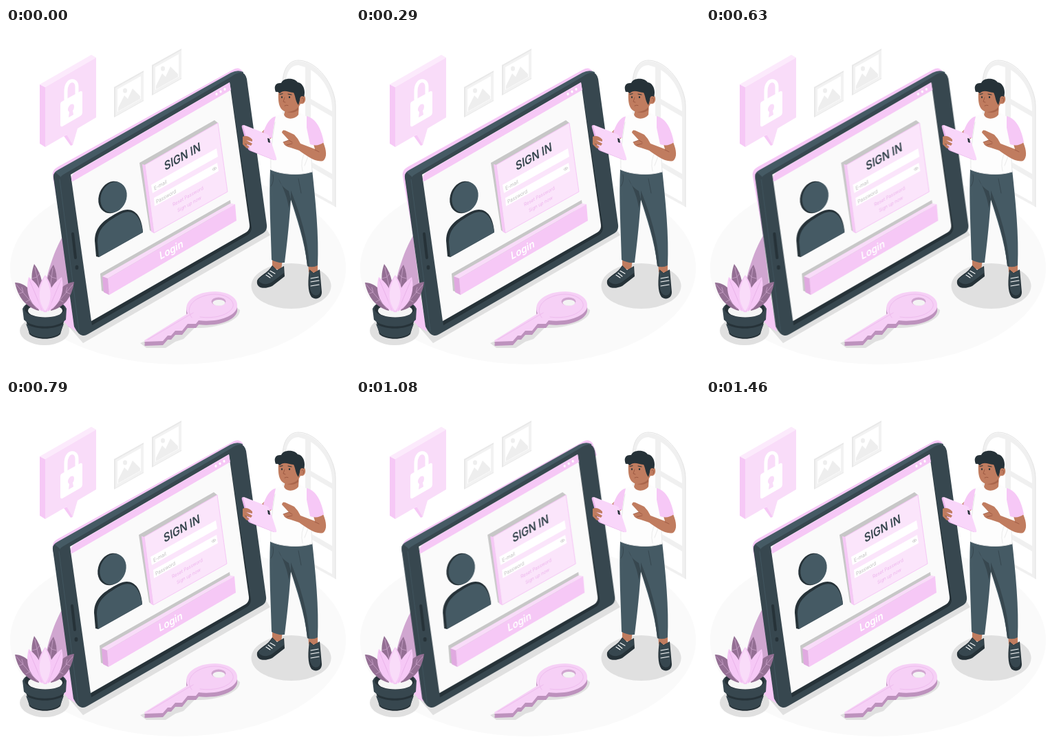
An HTML page for the animation above (1.5 s loop, 500 px wide and 500 px high).

```html
<!DOCTYPE html>
<html lang="en">
<head>
<meta charset="utf-8">
<title>Sign in</title>
<style>
  html, body { margin: 0; width: 100%; height: 100%; overflow: hidden; background: #fff; }
  svg { display: block; width: 100vw; height: 100vh; }
  text { font-family: Inter, Roboto, sans-serif; }
  .pale { fill: #f9dcf9; }
  .pink { fill: #f6c8f6; }
  .mauve { fill: #d0a6d0; }
  .dark { fill: #37474f; }
  .slate { fill: #455a64; }
  .ink { fill: #263238; }
  .floor { fill: #e0e0e0; }
  .skin { fill: #c07c5f; }
  .line { fill: none; stroke-linecap: round; stroke-linejoin: round; }
</style>
</head>
<body>
<svg viewBox="0 0 500 500">
  <defs>
    <g id="picture">
      <path d="M0 24L43 0V44L0 68Z" fill="#e8e8e8"/>
      <path d="M2 25L43 2V43L2 66Z" fill="#f2f2f2"/>
      <path d="M5 27L39 8V41L5 60Z" fill="#fff"/>
      <path d="M6 54L15 36L20 41L27 26L38 37V41L6 59Z" fill="#eee"/>
      <ellipse cx="16" cy="29" rx="3" ry="3.6" fill="#eee"/>
    </g>
    <path id="key" d="M201 454L264 415C256 398 276 383 304 383C327 384 338 394 336 406C332 421 304 428 280 425L276 430L264 430L256 440L246 440L240 447H235L228 455L202 456Z"/>
  </defs>

  <ellipse cx="250" cy="349" rx="244" ry="140" fill="#fafafa"/>

  <!-- arched window -->
  <path d="M402 218V82C402 60 411 48 425 48C452 48 479 84 479 114V260Z" fill="#f0f0f0"/>
  <path d="M402 82C402 58 412 47 425 47C453 47 479 84 479 114V260" class="line" stroke="#e3e3e3"/>
  <path d="M407 78C408 62 415 54 425 54L435 57V98L407 83ZM443 61C462 72 474 96 474 117V121L443 103ZM443 111L474 129V212L443 194ZM443 202L474 220V253L443 236ZM407 91L435 107V190L407 174Z" fill="#fff"/>

  <!-- speech bubble -->
  <path class="pink" d="M49 82L57 86V173L49 168ZM84 157L92 154L97 170L94 171Z"/>
  <path fill="#fceafc" d="M49 82L124 39L131 43L57 86Z"/>
  <path class="pale" d="M57 86L131 43V130L104 146L97 170L88 155L57 173Z"/>
  <path class="line" d="M87 104V92C87 73 103 73 103 85V95" stroke="#fff" stroke-width="5"/>
  <path fill="#fff" d="M81 107L108 92Q111 91 111 94V123Q111 126 108 128L82 143Q79 144 79 141V111Q79 108 81 107Z"/>
  <path class="pale" d="M90 119C90 111 99 107 99 114Q99 118 97 120L98 126L91 130L92 122Q90 121 90 119Z"/>

  <!-- wall pictures -->
  <use href="#picture" x="157" y="62"/>
  <use href="#picture" x="212" y="30"/>

  <!-- tablet shadow, stand and back -->
  <path class="floor" d="M88 430L112 458L384 301L374 285L110 435Z"/>
  <path class="mauve" d="M83 302C73 318 62 346 55 382L66 425L100 438Z"/>
  <path class="pink" d="M77 388L92 380L103 441L84 430Z"/>
  <path class="pink" d="M86 320L68 216Q66 207 75 202L329 61Q338 55 344 63L350 80L120 260Z"/>

  <g id="tablet">
    <path class="slate" d="M69 217Q68 210 76 206L327 65Q337 60 345 64L345 90L112 447Z"/>
    <path class="dark" d="M69 217Q69 212 72 210L79 216L113 447Q106 448 99 434Z"/>
    <path class="dark" d="M78 223Q77 216 85 212L327 71Q346 57 350 74L379 286Q380 294 374 298L119 445Q109 451 106 439Z"/>
    <path class="line" d="M78 220L106 440" stroke="#455a64" stroke-width=".8"/>
    <path class="ink" d="M94 214L325 79L357 290Q357 297 351 301L125 432Z"/>
    <path fill="#fafafa" d="M94 213L325 79L354 286Q355 293 349 297L124 426Z"/>
    <path class="pink" d="M95 222Q94 214 100 210L325 79L327 90L97 223Z"/>
    <g fill="#fff">
      <ellipse cx="306" cy="96" rx="1.6" ry="2"/>
      <ellipse cx="312" cy="92.5" rx="1.6" ry="2"/>
      <ellipse cx="318" cy="89" rx="1.6" ry="2"/>
    </g>
    <path class="line" d="M97 299L101 334" stroke="#263238" stroke-width="4"/>
    <ellipse class="ink" cx="103" cy="348" rx="2.4" ry="3.2"/>

    <!-- profile picture -->
    <ellipse class="ink" cx="154" cy="246" rx="19" ry="24" transform="rotate(22 154 246)"/>
    <ellipse class="slate" cx="156.5" cy="246" rx="18.5" ry="23" transform="rotate(22 156.5 246)"/>
    <path class="ink" d="M131 332L129 309C129 288 144 278 165 267C184 258 197 270 199 297L135 333Z"/>
    <path class="slate" d="M135 333L133 311C133 291 147 281 167 270C185 261 196 274 199 297Z"/>

    <!-- form -->
    <path fill="#c7c7c7" d="M194 196L303 134L308 138L215 298L209 294Z"/>
    <path class="pink" d="M198 198L202 199L215 298L211 296Z"/>
    <path d="M202 199L308 138L322 238L215 298Z" fill="#fbe5fb" stroke="#f6c8f6"/>
    <path fill="#fff" d="M211 228L306 175L308 187L213 240ZM215 247L307 196L309 208L216 259Z"/>
    <text transform="matrix(.8 -.45 .13 .98 231 207.500)" font-size="17.600" font-weight="600" fill="#37474f">SIGN IN</text>
    <g font-size="7.6" fill="#bdbdbd">
      <text transform="matrix(.82 -.46 .13 .98 215.5 236)">E-mail</text>
      <text transform="matrix(.82 -.46 .13 .98 218.5 255.5)">Password</text>
    </g>
    <g font-size="7.2" fill="#edb4ed">
      <text transform="matrix(.82 -.46 .13 .98 242.5 259.5)">Reset Password</text>
      <text transform="matrix(.82 -.46 .13 .98 249.5 268)">Sign up now</text>
    </g>
    <path d="M300 206Q302 201 306 203Q304 208 300 206Z" fill="none" stroke="#c4c4c4" stroke-width=".7"/>
    <circle cx="303" cy="204.5" r="1" fill="#c4c4c4"/>

    <!-- button -->
    <path fill="#c7c7c7" d="M137 357L326 250L327 258L148 385L139 382Z"/>
    <path fill="#e0a9e0" d="M140 361L148 364L150 388L142 384Z"/>
    <path class="pale" d="M140 361L326 255L333 256L148 364Z"/>
    <path class="pink" d="M148 364L333 256L335 280L150 388Z"/>
    <text transform="matrix(.82 -.46 .13 .98 224 337)" font-size="15.5" font-weight="600" fill="#fff">Login</text>
  </g>

  <!-- key -->
  <path class="floor" d="M195 458L204 465H232L246 456L258 452L274 436C300 437 340 428 340 410L330 402Z"/>
  <g fill="#bd92bd">
    <use href="#key" y="6"/>
    <use href="#key" y="3"/>
  </g>
  <use href="#key" fill="#f6d0f6"/>
  <path class="line" d="M206 453L272 414M270 421C258 405 276 388 303 387C321 387 332 396 330 405C325 417 304 423 282 420" stroke="#eebcee"/>
  <ellipse class="mauve" cx="309" cy="397.5" rx="10.5" ry="6"/>
  <ellipse cx="309.5" cy="399.3" rx="9" ry="4.4" fill="#f4f4f4"/>

  <!-- plant -->
  <ellipse class="floor" cx="56" cy="440" rx="36" ry="21"/>
  <path class="ink" d="M28 420L34 445C43 454 70 454 79 445L86 420Z"/>
  <path class="dark" d="M29 430L34 443C43 452 70 452 79 443L84 430C70 439 43 439 29 430Z"/>
  <path class="dark" d="M24 408L26 424C39 437 74 437 87 424L88 408C80 390 32 390 24 408Z"/>
  <ellipse class="ink" cx="56" cy="408" rx="29" ry="13"/>
  <ellipse cx="57" cy="411" rx="25" ry="9.5" fill="#f5f5f5"/>
  <g fill="#946f94">
    <path d="M13 370C30 370 43 386 48 411C28 406 17 390 13 370Z"/>
    <path d="M99 369C82 371 70 386 65 411C85 406 96 391 99 369Z"/>
    <path d="M41 343C34 362 37 383 52 401C56 376 52 358 41 343Z"/>
    <path d="M69 344C58 359 57 380 62 401C75 382 77 362 69 344Z"/>
  </g>
  <path class="line" d="M15 373L45 408M97 373L68 408M42 348L52 393M68 349L62 393M19 386L25 384L23 377M29 398L35 395L34 386M93 386L87 384L89 377M83 398L77 395L79 386M38 364L45 362L49 356M73 364L66 362L62 357" stroke="#c39cc3" stroke-width=".9"/>
  <path class="pink" d="M33 362C27 383 35 403 53 412C56 391 49 373 33 362ZM81 362C86 384 78 403 61 412C57 390 65 373 81 362Z"/>
  <path class="line" d="M34 366L52 409M80 366L62 409" stroke="#eab4ea"/>
  <path class="pink" d="M57 359C43 378 43 397 55 413H59C71 397 70 377 57 359Z"/>
  <path class="pale" d="M57 361C46 380 46 397 57 412C67 397 67 380 57 361Z"/>

  <!-- man -->
  <ellipse class="floor" cx="414.5" cy="375" rx="58" ry="33"/>
  <path class="skin" d="M387 334L402 336L400 352L387 349ZM439 340H453V356L440 355Z"/>
  <path class="ink" d="M387 345C380 357 369 359 365 367C363 379 376 380 387 375L405 361L404 346L394 352ZM441 351C439 366 438 383 444 391C450 396 459 393 459 384L456 351L447 356Z"/>
  <path class="dark" d="M387 346C382 357 371 360 367 366C369 373 380 374 387 369L404 356L403 347L394 353ZM441 352C441 370 440 381 446 387C451 391 457 388 457 380L455 352L447 357Z"/>
  <path class="line" d="M378 359L384 363M381 356L387 361M384 353L391 357M443 364L454 362M443 369L455 367M443 375L455 373" stroke="#fff" stroke-width="1.1"/>
  <path class="slate" d="M384 206H445C450 252 455 302 453 345Q446 349 438 346C434 308 422 276 414 249C412 282 408 318 405 341Q395 342 386 337C385 294 382 247 384 206Z"/>
  <path class="dark" d="M396 219C399 229 406 234 411 237L414 249L411 262C410 250 403 231 396 219ZM414 249C425 276 434 307 438 346L441 347C439 306 428 272 414 236Z"/>
  <path class="line" d="M425 219L429 240M388 213Q390 224 385 230" stroke="#37474f"/>

  <path class="skin" d="M375 148L389 157L364 179L354 171Z"/>
  <path class="pink" d="M393 128C383 130 378 141 374 151C378 158 384 161 390 160L399 138Z"/>
  <path d="M392 128C403 124 413 123 424 123C438 126 443 133 446 146L445 209C427 215 400 213 385 206C384 181 387 151 392 128Z" fill="#fdfdfd"/>
  <path class="line" d="M391 137C386 164 384 190 385 206C400 213 427 215 445 209L444 190" stroke="#e8e8e8"/>
  <path class="line" d="M436 177Q427 193 431 208M440 184L434 200" stroke="#ebebeb"/>
  <path class="skin" d="M407 116L426 109L425 126C420 133 407 134 404 126Z"/>
  <path d="M407 117Q417 122 425 112V119Q416 126 406 121Z" fill="#a9654b"/>

  <path class="skin" d="M396 93C395 108 397 120 408 122C420 122 426 115 428 110C434 112 437 104 434 99C430 96 426 98 424 102L422 88L400 87Z"/>
  <path class="ink" d="M392 93C389 86 391 79 400 80C403 72 419 72 424 79C432 80 436 91 433 100C429 97 427 101 427 105L425 112C420 105 421 99 418 94C410 93 403 89 398 95Q395 92 392 93Z"/>
  <path class="line" d="M398 96.500L402 95.500M410 96L415 97" stroke="#263238"/>
  <path class="line" d="M405 101L403 107L406 108M405 113Q408 111.500 410 112.500" stroke="#9d5a43"/>
  <ellipse class="ink" cx="401" cy="100.5" rx="1" ry="1.5"/>
  <ellipse class="ink" cx="412" cy="100.5" rx="1.1" ry="1.6"/>
  <path class="line" d="M430 102Q434 101 432 107" stroke="#9d5a43"/>

  <!-- handheld and arms -->
  <path d="M344 141Q342 142 343 145L351 174Q352 178 356 179L389 192L393 192L382 157Z" fill="#e8b3e8"/>
  <path d="M346 141L379 154Q382 155 383 158L393 189Q394 193 390 192L358 179Q355 178 354 175L345 144Q344 141 346 141Z" fill="#f9d6fa"/>
  <path class="ink" d="M380 160L383 161L384 167L381 166Z"/>
  <path class="skin" d="M344 158Q351 155 358 162L358 165L349 163L358 168L356 171L347 168L354 173L350 175L344 169Z"/>
  <path class="skin" d="M447 169L461 166C466 178 467 188 461 193C450 196 436 185 426 178L414 174Q404 172 403 166L411 163L401 152Q402 147 406 149L419 155Q425 161 428 168L449 176Z"/>
  <path class="line" d="M403 166L411 163L416 166M408 170L416 168M449 177L455 180" stroke="#9d5a43" stroke-width=".9"/>
  <path class="pink" d="M437 128C451 132 458 146 462 166Q453 173 442 169L437 145Z"/>
</svg>
<script>
  const shake = [[0, 0], [.1, -1], [.2, 2], [.3, -4], [.4, 4], [.5, -4],
                 [.6, 4], [.7, -4], [.8, 2], [.9, -1], [1, 0]];
  document.getElementById('tablet').animate(
    shake.map(([offset, x]) => ({
      offset,
      transform: `translateX(${x}px)`,
      easing: 'cubic-bezier(.36, .07, .19, .97)'
    })),
    { duration: 1500, iterations: Infinity }
  );
</script>
</body>
</html>
```
